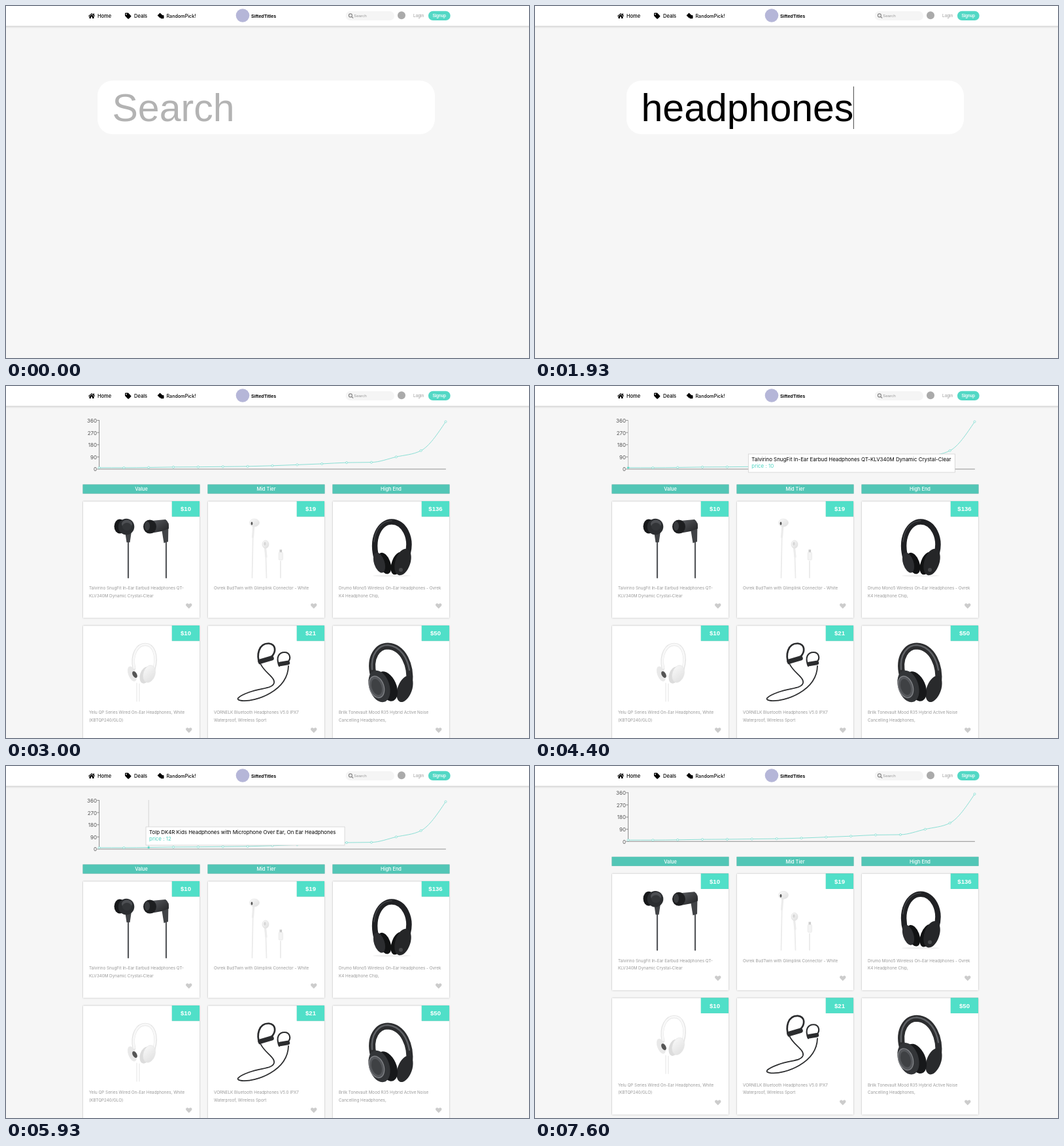
Animation of 800x538 px, one loop 8 s. Source, as an HTML page:

```html
<!DOCTYPE html>
<html lang="en">
<head>
<meta charset="utf-8">
<title>Headphone tiers</title>
<style>
  html, body { margin: 0; width: 100%; height: 100%; overflow: hidden; background: #f7f7f7; }
  svg { display: block; width: 100vw; height: 100vh; }
  text { font-family: Inter, "Open Sans", sans-serif; }
  .arial, .price { font-family: "Liberation Sans", Arial, sans-serif; }
  .nav { font-size: 7.5px; font-weight: 500; }
  .brand { font: 700 7.1px "Liberation Sans", Arial, sans-serif; }
  .field { font: 59px "Liberation Sans", Arial, sans-serif; }
  .tick { font-size: 8px; fill: #555; text-anchor: end; }
  .tier { font-size: 7.4px; font-weight: 500; fill: #fff; text-anchor: middle; }
  .price { font-size: 9.6px; font-weight: 700; fill: #fff; text-anchor: middle; }
  .desc { font-size: 6.3px; fill: #999; }
  .tip { font-size: 7.9px; }
  .shadow { filter: drop-shadow(0 .6px 1px rgba(0, 0, 0, .28)); }
  .lift { filter: drop-shadow(.5px .9px .6px rgba(0, 0, 0, .28)); }
  .line { fill: none; stroke-linecap: round; stroke-linejoin: round; }
</style>
</head>
<body>
<svg viewBox="0 0 800 538" preserveAspectRatio="none">
  <defs>
    <clipPath id="aboveCart"><rect x="340" y="31" width="110" height="58"/></clipPath>
    <linearGradient id="dark" x2="1" y2="1">
      <stop stop-color="#5a5c60"/><stop offset="1" stop-color="#1e1f21"/>
    </linearGradient>
    <linearGradient id="pale" x2="1" y2="1">
      <stop stop-color="#fafafa"/><stop offset="1" stop-color="#dedede"/>
    </linearGradient>
    <path id="heart" fill="#ccc" d="M0 4.2L-4 .2C-5.6-1.6-4.2-4-2.2-3.8-1.1-3.7-.4-3 0-2.4.4-3 1.1-3.7 2.2-3.8 4.2-4 5.6-1.6 4 .2Z"/>

    <g id="blackBuds">
      <path class="line" d="M187 232V293M245 236V293" stroke="#55575a" stroke-width="2.2"/>
      <path d="M182 222H192L189.5 239H184.5ZM237 212L248.5 210 248 238 241.5 240Z" fill="#414346"/>
      <ellipse cx="174" cy="214.5" rx="8.5" ry="11" fill="#17181a"/>
      <circle cx="184" cy="215" r="12.3" fill="#2b2d30"/>
      <ellipse cx="185" cy="211" rx="8" ry="6.5" fill="#4d4f53"/>
      <ellipse cx="185" cy="215" rx="7" ry="6" fill="#333538"/>
      <path d="M222 206L244 204Q250 208 249 218L238 222 222 225Z" fill="url(#dark)"/>
      <ellipse cx="220" cy="215" rx="10" ry="10.5" fill="#1d1e20"/>
      <ellipse cx="216" cy="214" rx="4" ry="7" fill="#393b3e"/>
    </g>

    <g id="whiteBuds">
      <path class="line" d="M378 216L376.5 293M397 246L398.5 293M420 268V293" stroke="#ebebeb" stroke-width="1.8"/>
      <path class="line" d="M379 212L377.5 231M396 243L398 261" stroke="#ececec" stroke-width="3.2"/>
      <ellipse cx="380" cy="209" rx="7.5" ry="6" fill="url(#pale)" stroke="#e2e2e2" stroke-width=".6"/>
      <ellipse cx="376" cy="210" rx="1.4" ry="2.6" fill="#555"/>
      <ellipse cx="397" cy="242" rx="5" ry="6" fill="url(#pale)" stroke="#dcdcdc" stroke-width=".6"/>
      <ellipse cx="396" cy="241" rx="1.6" ry="2.8" fill="#d5d5d5"/>
      <rect x="417.2" y="254" width="6.2" height="12" rx="1.5" fill="#f3f3f3" stroke="#dedede" stroke-width=".5"/>
      <rect x="418.5" y="250" width="3.6" height="4" fill="#ccc"/>
    </g>

    <g id="onEar">
      <ellipse cx="590" cy="290" rx="29" ry="1.6" fill="#f0f0f0"/>
      <path class="line" d="M567 264C558 232 572 207.5 590 207.5S622 231 614 258" stroke="#202124" stroke-width="8.5"/>
      <path class="line" d="M563 238C565 216 577 206 590 206" stroke="#3f4144" stroke-width="1.6"/>
      <ellipse cx="579" cy="271" rx="9" ry="17" fill="#111213" transform="rotate(-20 579 271)"/>
      <ellipse cx="571" cy="270" rx="8" ry="16" fill="#2c2d30" transform="rotate(-18 571 270)"/>
      <ellipse cx="599" cy="271" rx="9" ry="18" fill="#111213" transform="rotate(20 599 271)"/>
      <ellipse cx="607" cy="269" rx="11.5" ry="21" fill="#252628" transform="rotate(18 607 269)"/>
      <circle cx="604" cy="281" r="3" fill="#48494b"/>
    </g>

    <g id="whiteOnEar">
      <path class="line" d="M200 454V482M204 455V482" stroke="#e8e8e8" stroke-width="1.1"/>
      <path class="line" d="M196 432C191 410 201 395 213 395S233 411 226 434" stroke="#e2e2e2" stroke-width="4.6"/>
      <path class="line" d="M196 431C192 410 201 395 213 395S232 411 226 432" stroke="#f8f8f8" stroke-width="3"/>
      <ellipse cx="193" cy="440" rx="6" ry="12" fill="#e9e9e9" transform="rotate(-20 193 440)"/>
      <ellipse cx="197" cy="441" rx="3.2" ry="5.5" fill="#555" transform="rotate(-30 197 441)"/>
      <ellipse cx="213" cy="442" rx="8" ry="13" fill="#dcdcdc" transform="rotate(18 213 442)"/>
      <ellipse cx="219" cy="440" rx="9" ry="13.5" fill="url(#pale)" stroke="#e2e2e2" stroke-width=".6" transform="rotate(18 219 440)"/>
    </g>

    <g id="sport" class="line" stroke="#2b2c2e">
      <path d="M388 424C383 412 386 393 402 393.5 414 395 413 407 406 414" stroke-width="2.7"/>
      <path d="M418 428C412 414 418 407 426 407S437 416 431 422" stroke-width="2.1"/>
      <path d="M389 421L406 416" stroke-width="7.5"/>
      <path d="M419 425L431 423" stroke-width="6.5"/>
      <path d="M389 424C395 438 412 445 410 454 407 463 391 461 372 468S350 480 361 481C382 483 431 466 432 428" stroke-width="1.8"/>
    </g>

    <g id="overEar">
      <path class="line" d="M562 442C555 414 569 397.5 584 397.5 608 399 620 427 617 455" stroke="#2c2d2f" stroke-width="10"/>
      <path class="line" d="M560 433C558 409 570 396 584 396 604 398 614 416 617 434" stroke="#606266" stroke-width="2.4"/>
      <ellipse cx="610" cy="463" rx="11" ry="21" fill="#292a2c" transform="rotate(20 610 463)"/>
      <ellipse cx="583" cy="459" rx="14" ry="24" fill="#17181a" transform="rotate(-24 583 459)"/>
      <ellipse cx="571" cy="459" rx="15.5" ry="25" fill="#333538" transform="rotate(-18 571 459)"/>
      <ellipse cx="567" cy="460" rx="11" ry="17" fill="#55575b" stroke="#85878b" stroke-width="1.2" transform="rotate(-18 567 460)"/>
      <ellipse cx="567" cy="460" rx="7.5" ry="12.5" fill="#3f4144" transform="rotate(-18 567 460)"/>
    </g>
  </defs>

  <rect id="backdrop" width="800" height="538"/>

  <g id="searchPage">
    <rect x="140" y="114" width="516" height="82" rx="23" fill="#fff"/>
    <text id="query" class="field" x="162.5" y="176"></text>
    <rect id="caret" y="123" width="1" height="65" fill="#444"/>
  </g>

  <g id="loader">
    <g clip-path="url(#aboveCart)">
      <path id="shoe" fill="#a59b83" d="M397 87L404 86.5 405.5 84H407.5V100H399Z"/>
      <path id="sock" fill="#df6a66" d="M388 8H406V32L410 41 403 49 397 41 385 39 387 31Z"/>
    </g>
    <g fill="#c1c1c1">
      <path d="M371.5 92H433L428.5 120H377Z"/>
      <circle cx="354" cy="78" r="5"/>
      <circle cx="376" cy="144" r="6.7"/>
      <circle cx="427" cy="144" r="6.7"/>
    </g>
    <path class="line" stroke="#c1c1c1" stroke-width="4" d="M354 78L366 86 375 124.5H430L438.5 86M375 124.5L366 137H437"/>
  </g>

  <g id="results">
    <g id="chart"></g>
    <g id="cards"></g>
    <g id="hover">
      <path id="guide" d="M0 52V127" stroke="#ccc" stroke-width=".8"/>
      <circle id="activeDot" r="1.3" fill="#4fd5c3"/>
      <g id="tip">
        <rect id="tipBox" height="28" fill="#fff" stroke="#ccc" stroke-width=".7"/>
        <text id="tipName" class="tip" x="5" y="11.2"></text>
        <text id="tipPrice" class="tip" x="5" y="20.8" fill="#4fd5c3"></text>
      </g>
    </g>
  </g>

  <g id="header">
    <rect x="-5" y="-5" width="810" height="35.5" fill="#fff" style="filter:drop-shadow(0 1px 1.5px rgba(0,0,0,.22))"/>
    <path d="M126 15.3L131 11 133.5 13V11.5H135V14.3L136.2 15.3 135.5 16 131 12.2 126.7 16ZM127.5 16L131 13.1 134.5 16V19H132V16.5H130V19H127.5Z"/>
    <path fill-rule="evenodd" d="M182 11.5Q182 10.5 183 10.5H187L191.2 15Q191.7 15.6 191.2 16.2L187.8 19.5Q187 20 186.4 19.5L182 15ZM184 11.8A.9.9 0 1 0 184 13.6 .9.9 0 1 0 184 11.8Z"/>
    <path d="M235.5 10.6L239.5 14.3 235.8 18.6 231.6 14.6Z"/>
    <rect x="236.5" y="14" width="5" height="5.2" rx="1"/>
    <g class="nav">
      <text x="140" y="17.8">Home</text>
      <text x="196" y="17.8">Deals</text>
      <text x="245.5" y="17.8" font-size="7.2">RandomPick!</text>
    </g>
    <circle cx="362" cy="14.5" r="10.3" fill="#b5b6d8"/>
    <text class="brand" x="375" y="17.5">SiftedTitles</text>
    <rect x="519.5" y="8" width="74.5" height="14" rx="7" fill="#f5f5f5"/>
    <path class="line" stroke="#888" stroke-width="1.2" d="M529 16.5L530.8 18.2M529.4 14.4A2.5 2.5 0 1 1 524.4 14.4 2.5 2.5 0 1 1 529.4 14.4"/>
    <circle cx="605" cy="14.3" r="6" fill="#aaa"/>
    <rect x="646" y="7.7" width="33.7" height="14.3" rx="7.1" fill="#53d8c5"/>
    <g class="arial" font-size="6.6">
      <text class="arial" x="532" y="17.4" fill="#999" font-size="6.2">Search</text>
      <text class="arial" x="623" y="17.4" fill="#999">Login</text>
      <text class="arial" x="652.5" y="17.4" fill="#fff" stroke="#fff" stroke-width=".15">Signup</text>
    </g>
  </g>
</svg>

<script>
const $ = id => document.getElementById(id);
const LOOP = 8000;
const columns = [117.5, 308.5, 499.5];

// Chart
const prices = [10, 10, 12, 15, 16, 18, 20, 25, 32, 39, 48, 50, 90, 136, 350];
const step = 530 / (prices.length - 1);
const points = prices.map((p, i) => ({ x: 142.5 + i * step, y: 127 - p * 74.5 / 360 }));

function monotonePath(pts) {
  const slopes = pts.slice(1).map((p, i) => (p.y - pts[i].y) / step);
  const last = slopes.length;
  const tangents = pts.map((_, i) => {
    const a = slopes[i - 1], b = slopes[i];
    return (Math.sign(a) + Math.sign(b)) * Math.min(Math.abs(a), Math.abs(b), Math.abs(a + b) / 4) || 0;
  });
  tangents[0] = (3 * slopes[0] - tangents[1]) / 2;
  tangents[last] = (3 * slopes[last - 1] - tangents[last - 1]) / 2;
  const third = step / 3;
  return pts.slice(1).reduce((d, p, i) => {
    const q = pts[i];
    return d + `C${q.x + third} ${q.y + third * tangents[i]} ${p.x - third} ${p.y - third * tangents[i + 1]} ${p.x} ${p.y}`;
  }, `M${pts[0].x} ${pts[0].y}`);
}

const ticks = [0, 90, 180, 270, 360].map(v => ({ v, y: 127 - v * 74.5 / 360 }));
$('chart').innerHTML =
  `<path class="line" stroke="#777" stroke-width=".8" d="M142.5 52.5V127H672.5${ticks.map(t => `M139.5 ${t.y}H142.5`).join('')}"/>` +
  ticks.map(t => `<text class="tick" x="139" y="${t.y + 3.4}">${t.v}</text>`).join('') +
  `<path class="line" stroke="#7fdcd1" stroke-width=".9" d="${monotonePath(points)}"/>` +
  points.map(p => `<circle cx="${p.x}" cy="${p.y}" r="1.5" fill="#fff" stroke="#6fd8cb" stroke-width=".7"/>`).join('');

// Product cards
const products = [
  ['blackBuds', 10, 'Talvirino SnugFit In-Ear Earbud Headphones QT-', 'KLV340M Dynamic Crystal-Clear'],
  ['whiteBuds', 19, 'Ovrek BudTwin with Glimplink Connector - White', ''],
  ['onEar', 136, 'Drumo Mono5 Wireless On-Ear Headphones - Ovrek', 'K4 Headphone Chip,'],
  ['whiteOnEar', 10, 'Yelu QP Series Wired On-Ear Headphones, White', '(KBTQP240/GLO)'],
  ['sport', 21, 'VORNELK Bluetooth Headphones V5.0 IPX7', 'Waterproof, Wireless Sport'],
  ['overEar', 50, 'Brilk Tonevault Mood R35 Hybrid Active Noise', 'Cancelling Headphones,']
];

const tierBars = ['Value', 'Mid Tier', 'High End'].map((name, i) =>
  `<rect class="lift" x="${columns[i]}" y="150.5" width="179" height="14" fill="#52c6b6"/>
   <text class="tier" x="${columns[i] + 89.5}" y="160.3">${name}</text>`);

const cards = products.map(([art, price, first, second], i) => {
  const x = columns[i % 3], y = i < 3 ? 176 : 366;
  return `<rect class="shadow" x="${x + .5}" y="${y + .5}" width="178" height="178" fill="#fff"/>
    <use href="#${art}"/>
    <rect class="lift" x="${x + 136.3}" y="${y}" width="42.2" height="23.6" fill="#50dfc8"/>
    <text class="price" x="${x + 157.5}" y="${y + 15.4}">$${price}</text>
    <text class="desc" x="${x + 9.5}" y="${y + 135.3}">${first}</text>
    <text class="desc" x="${x + 9.5}" y="${y + 147}">${second}</text>
    <use href="#heart" x="${x + 162.3}" y="${y + 160}"/>`;
});
$('cards').innerHTML = tierBars.concat(cards).join('');

// Timeline
const typing = [[930, 1], [1000, 3], [1070, 4], [1130, 6], [1330, 7], [1480, 8], [1620, 9], [1760, 10]];
const word = 'headphones';
const LOADING = 2200, LOADED = 2870, HOVER = 4400, SCROLL = 7470;

const tips = [
  { from: HOVER, width: 316, name: 'Talvirino SnugFit In-Ear Earbud Headphones QT-KLV340M Dynamic Crystal-Clear' },
  { from: 4980, width: 259, name: 'Yelu QP Series Wired On-Ear Headphones, White (KBTQP240/GLO)' },
  { from: 5740, width: 304, name: 'Tolp DK4R Kids Headphones with Microphone Over Ear, On Ear Headphones' }
];
const tipTrack = [
  [4400, 327, 104], [4540, 230, 101], [4680, 174, 98], [4820, 153, 97], [4980, 153, 96],
  [5120, 169, 95], [5200, 178, 95], [5270, 179, 95], [5500, 190, 94], [5740, 190, 93],
  [5930, 214, 93], [6070, 222, 93], [6870, 223, 93], [7070, 228, 92]
];

const show = (id, on) => $(id).style.display = on ? '' : 'none';
const latest = (list, test) => list.filter(test).pop();

function trackAt(track, t) {
  const i = track.findIndex(k => k[0] > t);
  if (i < 0) return track[track.length - 1].slice(1);
  if (i === 0) return track[0].slice(1);
  const a = track[i - 1], b = track[i];
  const f = (t - a[0]) / (b[0] - a[0]);
  return [1, 2].map(n => a[n] + (b[n] - a[n]) * f);
}

function drawSearch(t) {
  const entry = latest(typing, k => k[0] <= t);
  const query = $('query');
  const text = entry ? word.slice(0, entry[1]) : 'Search';
  if (query.textContent !== text) query.textContent = text;
  query.setAttribute('fill', entry ? '#000' : '#b3b3b3');
  show('caret', t >= 270);
  $('caret').setAttribute('x', entry ? 162.5 + query.getComputedTextLength() - .5 : 163);
}

function drawLoader(t) {
  const fall = (t - 2600) * .3;
  $('sock').setAttribute('transform', `translate(0 ${fall}) rotate(${fall * .25} 397 35)`);
  $('shoe').setAttribute('transform', `translate(0 ${fall})`);
}

function drawHover(t) {
  const index = tips.filter(k => k.from <= t).length - 1;
  const { width, name } = tips[index], point = points[index];
  $('guide').setAttribute('transform', `translate(${point.x} 0)`);
  $('activeDot').setAttribute('cx', point.x);
  $('activeDot').setAttribute('cy', point.y);
  $('tip').setAttribute('transform', `translate(${trackAt(tipTrack, t).join(' ')})`);
  $('tipBox').setAttribute('width', width);
  $('tipName').textContent = name;
  $('tipPrice').textContent = `price : ${prices[index]}`;
}

function draw(t) {
  const searching = t < LOADING, loading = !searching && t < LOADED;
  const hovering = t >= HOVER && t < SCROLL;
  show('searchPage', searching);
  show('loader', loading);
  show('results', t >= LOADED);
  show('hover', hovering);
  $('backdrop').setAttribute('fill', loading ? '#fff' : '#f6f6f6');
  const scroll = t >= 7600 ? 11.7 : t >= SCROLL ? 5 : 0;
  $('results').setAttribute('transform', `translate(0 ${-scroll})`);
  if (searching) drawSearch(t);
  if (loading) drawLoader(t);
  if (hovering) drawHover(t);
}

function tick() {
  draw(performance.now() % LOOP);
  requestAnimationFrame(tick);
}
tick();
</script>
</body>
</html>
```
